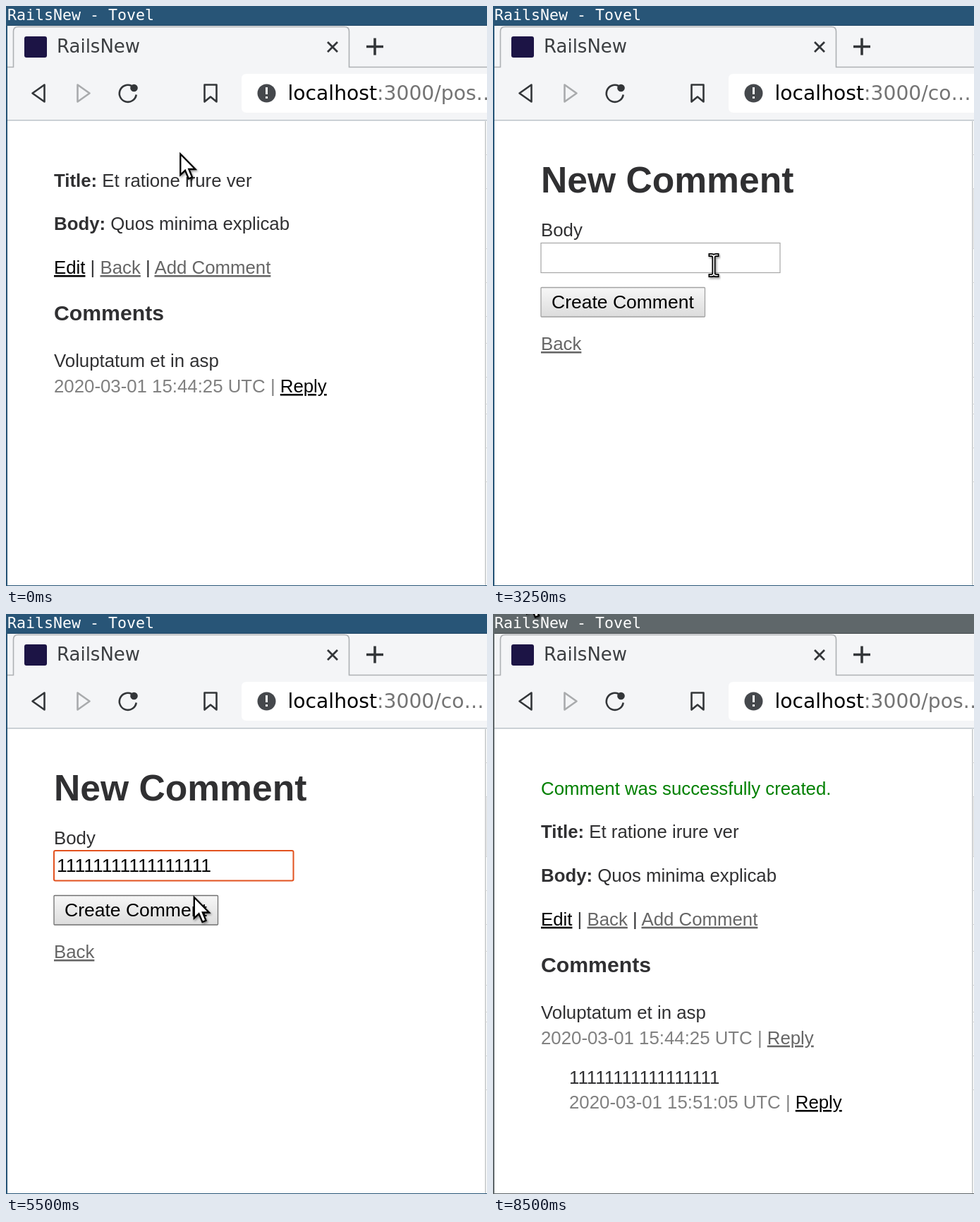
These frames come from a looping animation (682x821 px, 8750 ms). An HTML page:

```html
<!DOCTYPE html>
<html lang="en">
<head>
<meta charset="utf-8">
<title>Nested comments</title>
<style>
html, body { margin: 0; width: 100%; height: 100%; overflow: hidden; background: #fff; }
svg { display: block; }
.mono { font: 21.6px "DejaVu Sans Mono", monospace; fill: #fff; }
.ui { font: 26px "DejaVu Sans", sans-serif; fill: #3b3e41; }
.url { font-size: 28.2px; fill: #747474; }
.page { font: 25.8px "Liberation Sans", Arial, sans-serif; fill: #303032; }
.field { font-size: 26.5px; fill: #000; }
.link { fill: #000; text-decoration: underline; }
.seen { fill: #666; }
.hot { fill: #fff; }
.date { fill: #808080; }
b, .bold { font-weight: bold; }
.line { fill: none; stroke: #333639; stroke-width: 2.6; }
</style>
</head>
<body>
<svg id="stage" width="682" height="821" viewBox="0 0 682 821"></svg>
<script>
const STEP = 250, STEPS = 35;
const stage = document.getElementById('stage');

// Pointer path: step, x, y
const path = [
  [0, 246, 207], [1, 262, 236], [3, 368, 436], [5, 417, 524], [7, 421, 530], [10, 421, 530],
  [11, 416, 520], [13, 313, 367], [14, 310, 350], [15, 309, 348], [20, 309, 348],
  [21, 298, 368], [23, 233, 429], [28, 233, 429], [30, 125, 160], [32, 86, 72], [34, 47, -33]
];

function pointerAt(i) {
  const n = Math.max(1, path.findIndex(p => p[0] >= i));
  const [a, b] = [path[n - 1], path[n]];
  const k = (i - a[0]) / (b[0] - a[0]);
  return [a[1] + (b[1] - a[1]) * k, a[2] + (b[2] - a[2]) * k];
}

const rect = (x, y, w, h, fill, extra = '') =>
  `<rect x="${x}" y="${y}" width="${w}" height="${h}" fill="${fill}" ${extra}/>`;
const draw = (d, extra = '') => `<path class="line" d="${d}" ${extra}/>`;
const text = (x, y, str, cls = 'page', extra = '') =>
  `<text x="${x}" y="${y}" class="${cls}" ${extra}>${str}</text>`;
const span = (str, cls) => `<tspan class="${cls}">${str}</tspan>`;
const link = (str, cls = '') => span(str, 'link ' + cls);

const defs = `<defs>
  <linearGradient id="button" x2="0" y2="1"><stop stop-color="#f7f7f7"/><stop offset="1" stop-color="#dcdcdc"/></linearGradient>
  <linearGradient id="fade"><stop stop-color="#f4f5f7" stop-opacity="0"/><stop offset="1" stop-color="#f4f5f7"/></linearGradient>
  <filter id="shadow" x="-50%" y="-50%" width="200%" height="200%"><feDropShadow dx="1.5" dy="2" stdDeviation="1.5" flood-opacity=".4"/></filter>
</defs>`;

function spinner(angle, withIcon) {
  const arc = `<circle cx="42" cy="58" r="14.5" fill="none" stroke="#1cb0f0" stroke-width="3.4"
    pathLength="360" stroke-dasharray="235 125" transform="rotate(${angle} 42 58)"/>`;
  return (withIcon ? '<circle cx="42" cy="58" r="10.5" fill="#1c1445"/>' : '') + arc;
}

function chrome(s) {
  const frame = s.active ? '#285577' : '#5f676a';
  let out = rect(0, 0, 682, 821, '#fff') + rect(2, 27, 680, 135, '#f4f5f7')
    + rect(0, 0, 682, 27, frame) + rect(0, 27, 682, 1, s.active ? '#224866' : '#454b4e')
    + rect(0, 27, 2, 794, frame) + rect(0, 820, 682, 1, frame)
    + text(2, 20, s.title + ' - Tovel', 'mono');

  out += draw('M2 86.5H10.5V36Q10.5 29.5 17 29.5H480Q486.5 29.5 486.5 36V86.5H682', 'style="stroke:#aeb1b4;stroke-width:1.6"')
    + (s.spin ? spinner(s.angle, s.icon) : rect(26, 43, 32, 30, '#1c1445', 'rx="3"'));
  const long = s.tab.length > 24;
  out += text(72, 66, s.tab, 'ui') + (long ? rect(396, 36, 44, 46, 'url(#fade)') : '')
    + draw('M456 51l14 14m0-14l-14 14', 'style="stroke-width:2.8"')
    + draw('M511 57.5h24m-12-12v24', 'style="stroke-width:3.6"');

  out += draw('M54.500 111.500V135.500L37.500 123.500Z', 'stroke-linejoin="round"')
    + draw('M101.500 111.500V135.500L118.500 123.500Z', 'style="stroke:#a9abad" stroke-linejoin="round"')
    + (s.busy
      ? draw('M161 111.500l24 24.500m0-24.500l-24 24.500')
      : draw('M178 113A12 12 0 1 0 184.700 125.500') + '<circle cx="181.500" cy="116" r="5.300" fill="#333639"/>')
    + draw('M281.500 111.500H298.500V135.500L290 128.500L281.500 135.500Z', 'stroke-linejoin="round"')
    + '<path d="M682 96H341Q334 96 334 103V144Q334 151 341 151H682Z" fill="#fff"/>'
    + '<circle cx="369.500" cy="123.500" r="13" fill="#45484c"/>'
    + rect(368, 115, 3, 10, '#fff') + rect(368, 128, 3, 3, '#fff')
    + text(399.5, 133, span('localhost', 'url" style="fill:#000') + ':3000/' + s.url + '…', 'ui url')
    + rect(2, 161, 680, 1.5, '#bcc3c9');

  out += rect(679, 163, 1.6, 657, '#c6c8ca');
  if (s.visited) out += rect(681, 258, 1, 85, '#e4e4e4');
  for (const y of [210, 258, 343, 391, 439, 477, 525, 563, 577, 625, 673]) out += rect(681, y, 1, 1, '#ccc');
  return out;
}

function post(dy, hover, created) {
  const date = time => span(`2020-03-01 ${time} UTC | `, 'date');
  const x = 68;
  let out = created ? text(x, 255.5, 'Comment was successfully created.', 'page', 'style="fill:#008000"') : '';
  if (hover) out += rect(389, 523, 66.500, 30, '#000');
  out += text(x, 255.5 + dy, span('Title:', 'bold') + ' Et ratione irure ver')
    + text(x, 317.3 + dy, span('Body:', 'bold') + ' Quos minima explicab')
    + text(x, 379 + dy, `${link('Edit')} | ${link('Back', 'seen')} | ${link('Add Comment', 'seen')}`)
    + text(x, 445 + dy, 'Comments', 'page bold', 'style="font-size:30.2px"')
    + text(x, 511 + dy, 'Voluptatum et in asp')
    + text(x, 547 + dy, date('15:44:25') + link('Reply', created ? 'seen' : hover ? 'hot' : ''));
  if (created) {
    out += text(108, 664.5, '1'.repeat(17)) + text(108, 700, date('15:51:05') + link('Reply'));
  }
  return out;
}

function form(s) {
  let out = text(68, 264, 'New Comment', 'page bold', 'style="font-size:51.6px"')
    + text(68, 326, 'Body')
    + (s.focus
      ? rect(68, 335, 339.5, 42.5, '#fff', 'rx="2" stroke="#e2521f" stroke-width="2"')
      : rect(68, 335.5, 339, 42, '#fff', 'stroke="#a6a6a6" stroke-width="1.2"'))
    + text(72, 365, '1'.repeat(s.typed), 'page field')
    + rect(68, 398.5, 232.5, 41.5, 'url(#button)', `rx="1" stroke="${s.over ? '#707070' : '#a2a2a2'}" stroke-width="1.3"`)
    + text(83, 427.5, 'Create Comment', 'page field')
    + text(68, 487, link('Back', 'seen'));
  if (s.caret) out += rect(s.typed ? 73 + s.typed * 12.77 : 73, 342, 1.8, 29, '#000');
  if (s.list) out += rect(67, 378, 384, 441, '#fff', 'stroke="#c4c4c4"');
  return out;
}

function bubble(str, opacity) {
  return '<path d="M2 775.500H216Q224.500 775.500 224.500 784V820H2Z" fill="#f4f5f7" stroke="#dcdee0"/>'
    + text(11, 807, str, 'ui', `style="fill:#747678" opacity="${opacity}"`);
}

function pointer(i) {
  const [x, y] = pointerAt(i);
  if (i >= 13 && i < 22) {
    const beam = 'M-5 1.500H-3Q0 1.500 0 5Q0 1.500 3 1.500H5M0 4V28M-5 30.500H-3Q0 30.500 0 27Q0 30.500 3 30.500H5';
    return `<g transform="translate(${x} ${y - 16})" fill="none" filter="url(#shadow)" stroke-linecap="square">
      <path d="${beam}" stroke="#000" stroke-width="5"/><path d="${beam}" stroke="#fff" stroke-width="1.6"/></g>`;
  }
  return `<path transform="translate(${x} ${y})" d="M1.300 2.500V32L8 25.800L13 37.500L18 35.300L13.300 24H22.500Z"
    fill="#fff" stroke="#000" stroke-width="2.300" filter="url(#shadow)"/>`;
}

function scene(i) {
  const within = (a, b) => i >= a && i < b;
  const toForm = within(8, 10), toPost = within(24, 28);
  const address = toForm ? 'localhost:3000/comments/34/comments/new' : toPost ? 'localhost:3000/posts/9' : 'RailsNew';
  const s = {
    active: i < 34,
    title: address,
    tab: toForm ? 'localhost:3000/comments/3' : address,
    url: within(8, 24) ? 'co' : 'pos',
    busy: toForm || toPost,
    spin: within(8, 11) || within(24, 29),
    icon: i >= 10,
    angle: i < 20 ? (i - 9) * 90 : (i - 27) * 90,
    visited: i >= 8,
    focus: within(14, 23),
    typed: Math.max(0, Math.min(17, (i - 15) * 6 - 1)),
    caret: within(14, 23) && (i < 19 || i % 4 < 2),
    list: i === 15,
    over: within(22, 28)
  };
  let out = defs + chrome(s);
  out += i < 10 ? post(0, i >= 5, false) : i < 28 ? form(s) : post(61.7, false, true);
  if (within(6, 10)) out += bubble('localhost:300…', i < 9 ? 1 : 0.75);
  if (within(24, 31)) out += bubble('Waiting for lo…', i < 28 ? 1 : i < 29 ? 0.5 : 0);
  return out + pointer(i);
}

let shown = -1;
const start = performance.now();
function tick() {
  const i = Math.floor((performance.now() - start) / STEP) % STEPS;
  if (i !== shown) stage.innerHTML = scene(shown = i);
  requestAnimationFrame(tick);
}
tick();
</script>
</body>
</html>
```
